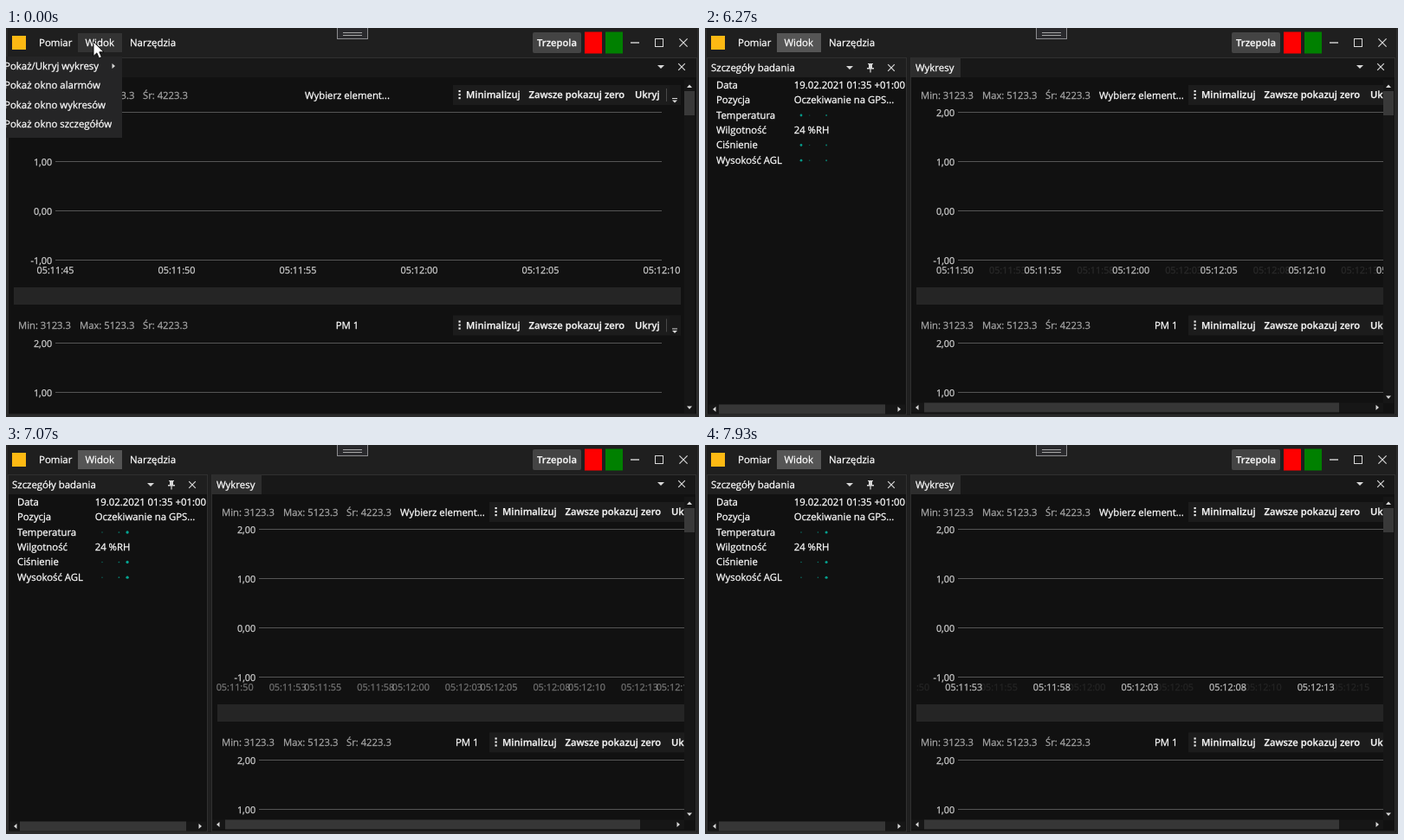
An HTML page that plays this animation: 800x450 px, repeating every 8000 ms.

```html
<!DOCTYPE html>
<html lang="pl">
<head>
<meta charset="utf-8">
<title>Wykresy</title>
<style>
  html, body { margin: 0; width: 100%; height: 100%; overflow: hidden; background: #1f1f1f; }
  svg { display: block; }
  #stage { width: 100vw; height: 100vh; }
  text { font-family: "Open Sans", "Noto Sans", sans-serif; font-size: 11.35px; fill: #fff; stroke: #fff; stroke-width: .25px; text-rendering: geometricPrecision; white-space: pre; }
  .menu { font-size: 11.45px; }
  .axis { font-size: 10.85px; fill: #d0d0d0; stroke: #d0d0d0; }
  .stat { font-size: 11.25px; fill: #a6a6a6; stroke: #a6a6a6; }
  .bold { font-size: 11.2px; font-weight: 600; fill: #f4f4f4; stroke: #f4f4f4; }
</style>
</head>
<body>
<svg id="stage" viewBox="0 0 800 450"></svg>
<script>
const LOOP = 8000, HOVER = 70, DOCK = 5670;
const TEAL = '#00dcc3', ICON = '#d8d8d8', TRACK = '#161616', STRIP = '#181818';

const rect = (x, y, w, h, fill, extra = '') =>
  `<rect x="${x}" y="${y}" width="${w}" height="${h}" fill="${fill}" ${extra}/>`;
const text = (x, y, s, cls = '', anchor = 'start') =>
  `<text x="${x}" y="${y}" class="${cls}" text-anchor="${anchor}">${s}</text>`;
const line = (d, color, w = 1) => `<path d="${d}" fill="none" stroke="${color}" stroke-width="${w}"/>`;
const fillPath = (d, color = ICON) => `<path d="${d}" fill="${color}"/>`;
const cross = (x, y, r, w = 1.2) =>
  line(`M${x - r} ${y - r}l${2 * r} ${2 * r}m0 ${-2 * r}l${-2 * r} ${2 * r}`, ICON, w);
const down = (x, y, r = 4) => fillPath(`M${x - r} ${y}h${2 * r}l${-r} ${r}z`);
const clock = s => {
  const t = 5 * 3600 + 11 * 60 + s;
  return [t / 3600, t / 60 % 60, t % 60].map(v => String(Math.floor(v)).padStart(2, '0')).join(':');
};

function titleBar() {
  return rect(0, 0, 800, 450, '#2b2b2b') + rect(2, 0, 796, 448, '#1f1f1f') +
    rect(382.5, -1, 35, 13.5, '#2a2a2d', 'stroke="#8c8c8f"') +
    line('M389 5.5h22m-22 3h22', '#a8a8a8') +
    rect(7, 9, 16, 16, '#fdb913') +
    '<rect id="view" x="83" y="6" width="51" height="22"/>' +
    text(38, 21, 'Pomiar', 'menu') + text(91.5, 21, 'Widok', 'menu') + text(143, 21, 'Narzędzia', 'menu') +
    rect(608, 5, 56, 24, '#444', 'rx="2"') + text(636, 21, 'Trzepola', 'bold', 'middle') +
    rect(668, 4.5, 20, 25, '#f00') + rect(692, 4.5, 20, 25, '#008000') +
    line('M721 17h10', ICON, 1.4) + rect(749.5, 12.5, 9, 9, 'none', `stroke="${ICON}"`) +
    cross(782, 17, 4.6);
}

function toolbar(x, y) {
  const grip = [-5, -1, 3].map(d => rect(x + 6.5, y + d, 2.2, 2.2, '#eee')).join('');
  return rect(x, y - 11, 263, 23, '#1c1c1c') + rect(x + 250, y - 11, 13, 23, '#191919') + grip +
    text(x + 15, y + 4, 'Minimalizuj', 'bold') +
    text(x + 87.5, y + 4, 'Zawsze pokazuj zero', 'bold') +
    text(x + 210, y + 4, 'Ukryj', 'bold') +
    line(`M${x + 246.5} ${y - 7}v15`, '#4a4a4a') +
    line(`M${x + 253} ${y + 4.5}h6`, ICON) + down(x + 256, y + 6.5, 3);
}

function chartHead(x, tool, y) {
  return [[14, 'Min: 3123.3'], [85, 'Max: 5123.3'], [158, 'Śr: 4223.3']]
    .map(([dx, s]) => text(x + dx, y + 4.5, s, 'stat')).join('') + toolbar(tool, y);
}

// Both charts of a view; x is the shift from the undocked layout.
function charts(x, tool, right) {
  const rows = [[97.5, '2,00'], [154.5, '1,00'], [211.5, '0,00'], [268.5, '-1,00'], [364.5, '2,00'], [421.5, '1,00']];
  return chartHead(x, tool, 77) + chartHead(x, tool, 343.5) +
    rows.map(([y, s]) => line(`M${x + 57} ${y}H${right}`, '#555') +
      text(x + 53.2, y + 4, s, 'axis', 'end')).join('') +
    rect(x + 9, 300, 770, 20, '#252525');
}

function vScroll(bottom) {
  return rect(783, 60, 12, bottom - 60, TRACK) + rect(783, 73, 12, 28, '#393939') +
    fillPath('M786 69l3 -3.5l3 3.5z') +
    fillPath(`M786 ${bottom - 8.5}h6l-3 3.5z`);
}

function hScroll(x, y, w, from, to) {
  return rect(x, y, w, 11, TRACK) + rect(from, y, to - from, 11, '#363636') +
    fillPath(`M${x + 8.5} ${y + 2.5}v6l-3.5 -3z`) +
    fillPath(`M${x + w - 8.5} ${y + 2.5}v6l3.5 -3z`);
}

const clip = (x, right, body) =>
  `<svg x="${x}" y="0" width="${right - x}" height="450" viewBox="${x} 0 ${right - x} 450">${body}</svg>`;
const chartIcons = () => down(756, 43) + cross(780, 45, 3.8);
const frame = (x, w, head) => rect(x, 34, w, 23, head) + rect(x, 57, w, 390, '#111') +
  rect(x - .5, 34.5, w + 1, 412.5, 'none', 'stroke="#303030"');

function undocked() {
  const times = [0, 1, 2, 3, 4, 5].map(i =>
    text(57 + 140 * i, 284, clock(45 + 5 * i), 'axis', 'middle')).join('');
  const items = ['Pokaż/Ukryj wykresy', 'Pokaż okno alarmów', 'Pokaż okno wykresów', 'Pokaż okno szczegółów']
    .map((s, i) => text(-2, 48 + 22.4 * i, s, 'menu')).join('');
  return frame(3, 794, STRIP) + chartIcons() + charts(0, 516, 757) + times +
    text(394, 81.5, 'Wybierz element...', '', 'middle') + text(394, 348, 'PM 1', '', 'middle') + vScroll(446) +
    rect(0, 33, 134, 94, '#252526') + items + fillPath('M122.5 41l3.5 3l-3.5 3z') +
    '<path d="M101 16v16.5l3.8 -3.6l2.6 6l3 -1.3l-2.6 -5.8h5.2z" fill="#fff" stroke="#000" stroke-width=".9"/>';
}

function docked() {
  const details = [['Data', '19.02.2021 01:35 +01:00'], ['Pozycja', 'Oczekiwanie na GPS...'], ['Temperatura'],
    ['Wilgotność', '24 %RH'], ['Ciśnienie'], ['Wysokość AGL']]
    .map(([name, value = ''], i) => text(13, 69.7 + 17.4 * i, name) + text(102.7, 69.7 + 17.4 * i, value)).join('');
  return frame(3, 229, '#1f1f1f') + text(7, 50, 'Szczegóły badania', 'menu') + down(167, 44) +
    fillPath('M188 41h6v1h-1v4h2v1.4h-3.4v4h-1.2v-4h-3.4v-1.4h2v-4h-1z') + cross(215, 46, 3.8) +
    clip(3, 232, details) + '<g id="dots"></g>' + hScroll(4, 435.5, 227, 16, 208) +
    frame(238, 558, STRIP) + rect(238, 34, 57, 23, '#2d2d2d') + text(243, 49.5, 'Wykresy', 'menu') + chartIcons() +
    clip(238, 783, charts(235, 558, 783) + text(455, 81.5, 'Wybierz element...') + text(519, 348, 'PM 1')) +
    clip(243, 783, '<g id="times"></g>') +
    vScroll(434) + hScroll(238, 433.5, 545, 253, 732);
}

const stage = document.getElementById('stage');
stage.innerHTML = titleBar() + `<g id="open">${undocked()}</g><g id="dock">${docked()}</g>`;
const [view, open, dock, dots, times] = ['view', 'open', 'dock', 'dots', 'times'].map(id => document.getElementById(id));

// Triangle wave running right over four dots, eight dots long.
function drawDots(t) {
  const peak = t < 6600 ? -6 + 6.5 * Math.max(0, t - 5800) / 800 : .5 + .0094 * (t - 6600);
  let out = '';
  for (let i = 0; i < 4; i++) {
    const d = (((peak - i) % 8) + 8) % 8;
    const size = 1 - Math.min(d, 8 - d) / 4;
    for (const y of [101, 135.5, 153.2])
      out += `<circle cx="${111 + 9.7 * i}" cy="${y}" r="${(3.1 * size).toFixed(2)}" fill="${TEAL}" opacity="${Math.sqrt(size).toFixed(2)}"/>`;
  }
  dots.innerHTML = out;
}

// The axis slides three seconds on while the new labels fade in.
function drawTimes(t) {
  const p = Math.max(0, (t - 6120) / 2000);
  const step = p > 0 ? 20.32 : 20.45;
  const fresh = .05 + .95 * p;
  const set = (first, alpha) => {
    let out = `<g opacity="${Math.max(0, Math.min(1, alpha)).toFixed(3)}">`;
    for (let s = first; s < 28; s += 5)
      out += text((293 + step * s - 61 * p).toFixed(2), 284, clock(50 + s), 'axis', 'middle');
    return out + '</g>';
  };
  times.innerHTML = set(0, 1 - p) + set(3, fresh);
}

function draw(t) {
  const isDocked = t >= DOCK;
  view.setAttribute('fill', t < HOVER ? '#333' : '#555');
  open.style.display = isDocked ? 'none' : '';
  dock.style.display = isDocked ? '' : 'none';
  if (!isDocked) return;
  const tick = t < 5800 ? DOCK : 6600 + Math.floor((t - 6595) / 66.5) * 66.5;
  drawDots(tick);
  drawTimes(tick);
}

const start = performance.now();
function loop() {
  draw((performance.now() - start) % LOOP);
  requestAnimationFrame(loop);
}
draw(0);
requestAnimationFrame(loop);
</script>
</body>
</html>
```
